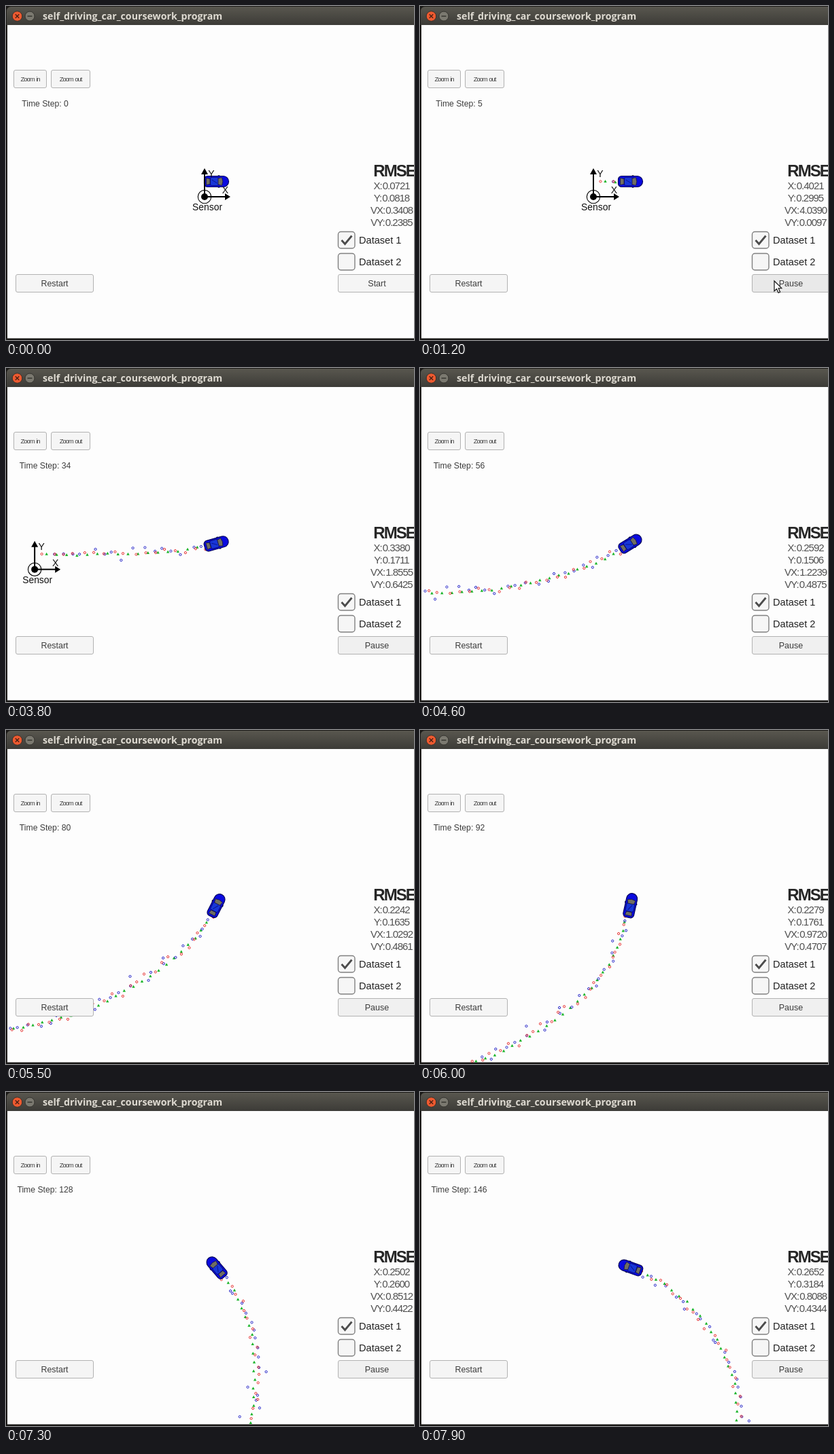
Animation of 600x492 px, one loop 8000 ms. Source, as an HTML page with a canvas:

```html
<!DOCTYPE html>
<html lang="en">
<head>
<meta charset="utf-8">
<title>Tracking simulator</title>
<style>
html, body { margin: 0; height: 100%; overflow: hidden; background: #1a1917; }
canvas { display: block; }
</style>
</head>
<body>
<canvas id="stage" width="600" height="492"></canvas>
<script>
const ctx = document.getElementById('stage').getContext('2d');
const SANS = '"Liberation Sans", Arial, sans-serif';
const LOOP = 8000, LAST_STEP = 146, CAR_X = 309.5, CAR_Y = 258.5;

// [time in ms, simulation step]: two stalls, then a steady run
const clock = [[0, 0], [900, 0], [1200, 5], [2000, 5], [2200, 7], [2700, 7], [3100, 14],
  [4600, 56], [5500, 80], [6600, 107], [7900, LAST_STEP]];

// step, world x, world y, heading in degrees, RMSE of x, y, vx, vy
const poses = [
  [0, 0, 0, 0, .0721, .0818, .3408, .2385],
  [5, 37, 0, 0, .4021, .2995, 4.0390, .0097],
  [14, 105, -1, 1, .4096, .1898, 2.4297, .7834],
  [56, 397, -73, 32, .2592, .1506, 1.2239, .4875],
  [80, 520, -191, 63, .2242, .1635, 1.0292, .4861],
  [107, 551, -361, 96, .2326, .1918, .9006, .4514],
  [LAST_STEP, 391, -566, 160, .2652, .3184, .8088, .4344]
];

const lerp = (a, b, u) => a + (b - a) * u;

// Seeded noise between -1 and 1
function noise(n) {
  const v = Math.sin(n * 12.9898) * 43758.5453;
  return 2 * (v - Math.floor(v)) - 1;
}

function segment(table, key) {
  let i = 0;
  while (i < table.length - 2 && key >= table[i + 1][0]) i++;
  const a = table[i], b = table[i + 1];
  return [a, b, (key - a[0]) / (b[0] - a[0])];
}

function stepAt(ms) {
  const [a, b, u] = segment(clock, ms);
  return Math.round(lerp(a[1], b[1], u));
}

// Cubic path through the poses, tangent to each heading
function poseAt(step) {
  const [a, b, u] = segment(poses, step);
  const speed = 1.03 * Math.hypot(b[1] - a[1], b[2] - a[2]);
  const ha = a[3] * Math.PI / 180, hb = b[3] * Math.PI / 180;
  const curve = (p, q, m, n) => (1 + 2 * u) * (1 - u) ** 2 * p + u * u * (3 - 2 * u) * q
    + speed * (u * (1 - u) ** 2 * m + u * u * (u - 1) * n);
  return {
    x: curve(a[1], b[1], Math.cos(ha), Math.cos(hb)),
    y: curve(a[2], b[2], -Math.sin(ha), -Math.sin(hb)),
    heading: lerp(ha, hb, u),
    rmse: a.slice(4).map((v, i) => lerp(v, b[i + 4], u))
  };
}

// A point beside the path: `ahead` along the heading, `left` across it
function beside(step, ahead, left) {
  const p = poseAt(step), c = Math.cos(p.heading), s = Math.sin(p.heading);
  return [p.x + ahead * c - left * s, p.y - ahead * s - left * c];
}

// Every other step leaves an estimate, a lidar and a radar reading
const markers = [];
for (let s = 0; s <= LAST_STEP; s += 2) {
  const early = Math.min(1, (s + 2) / 30);
  const drift = 6 * Math.exp(-(((s - 100) / 12) ** 2));
  const wild = noise(s + 900);
  markers.push(
    { step: s + 2, at: beside(s, 0, drift - 1 + 1.5 * noise(s + 1)), color: '#18b428', solid: true },
    { step: s + 1, at: beside(s, -5 + 3 * noise(s + 300), 6 * early * noise(s + 500)), color: '#e83030' },
    { step: s + 2, at: beside(s + 1, 5 * noise(s + 700), early * (5 * wild + 18 * wild ** 5)), color: '#2222c8' }
  );
}

function text(str, x, y, size, { align = 'center', color = '#3c3c3c', weight = '', space = 0, gap = 0, family = SANS } = {}) {
  ctx.font = `${weight} ${size}px ${family}`;
  ctx.textAlign = align;
  ctx.letterSpacing = space + 'px';
  ctx.wordSpacing = gap + 'px';
  ctx.fillStyle = color;
  ctx.fillText(str, x, y);
}

function paint(fill, stroke, width = 1) {
  if (fill) { ctx.fillStyle = fill; ctx.fill(); }
  if (stroke) { ctx.strokeStyle = stroke; ctx.lineWidth = width; ctx.stroke(); }
}

function box(x, y, w, h, r, ...style) {
  ctx.beginPath();
  ctx.roundRect(x, y, w, h, r);
  paint(...style);
}

function disc(x, y, r, ...style) {
  ctx.beginPath();
  ctx.arc(x, y, r, 0, 7);
  paint(...style);
}

function line(points, color, width) {
  ctx.beginPath();
  for (const [x, y] of points) ctx.lineTo(x, y);
  paint(null, color, width);
}

function poly(points, ...style) {
  ctx.beginPath();
  for (const [x, y] of points) ctx.lineTo(x, y);
  ctx.closePath();
  paint(...style);
}

function drawWindow() {
  ctx.fillStyle = '#1a1917';
  ctx.fillRect(0, 0, 600, 492);
  ctx.fillStyle = '#fdfdfd';
  ctx.fillRect(2, 28, 598, 461.5);
  const bar = ctx.createLinearGradient(0, 1, 0, 28);
  bar.addColorStop(0, '#59574f');
  bar.addColorStop(1, '#3c3b37');
  box(1, 1, 610, 27, [6, 0, 0, 0], bar);
  disc(16.5, 15, 7.3, '#ee5a30', '#37302a');
  line([[13.8, 12.3], [19.2, 17.7]], '#4a2015', 1.4);
  line([[19.2, 12.3], [13.8, 17.7]], '#4a2015', 1.4);
  disc(35, 15, 7, '#7b7970', '#35342f');
  line([[31.5, 15], [38.5, 15]], '#35342f', 1.5);
  text('self_driving_car_coursework_program', 54, 20, 14.2,
    { align: 'left', color: '#dfdbd2', weight: 'bold', family: '"Open Sans", "Noto Sans", sans-serif' });
}

function drawMarker({ at: [wx, wy], color, solid }, car) {
  const x = CAR_X + wx - car.x, y = CAR_Y + wy - car.y;
  if (x < 3 || y > 488) return;
  if (solid) poly([[x - 2.2, y + 1.8], [x, y - 2.2], [x + 2.2, y + 1.8]], color);
  else disc(x, y, 1.6, null, color, 1);
}

function drawCar(heading) {
  ctx.save();
  ctx.translate(CAR_X, CAR_Y);
  ctx.rotate(-heading);
  box(2, -9.3, 3, 18.6, 1, '#08084a');
  box(-18, -8, 36, 16, [5, 8, 8, 5], '#0a0ae0', '#05055c', 1.2);
  box(-9, -6, 12, 12, 2, '#1836d8', '#06066a', .8);
  poly([[-15, -5], [-9.5, -4], [-9.5, 4], [-15, 5]], '#706e62', '#15154a', .8);
  poly([[2.5, -4.5], [8, -6], [9.3, 0], [8, 6], [2.5, 4.5]], '#706e62', '#15154a', .8);
  line([[-7, -2.5], [1, 2.5]], '#0a1690', 1);
  ctx.restore();
}

function drawSensor(x, y) {
  disc(x, y, 9.7, null, '#000', 1.1);
  disc(x, y, 5, '#000');
  line([[x, y], [x, y - 34]], '#000', 2);
  line([[x, y], [x + 31, y]], '#000', 2);
  poly([[x - 5, y - 33], [x, y - 42], [x + 5, y - 33]], '#000');
  poly([[x + 30, y - 5], [x + 38, y], [x + 30, y + 5]], '#000');
  text('Y', x + 10, y - 29, 14, { color: '#111' });
  text('X', x + 30.5, y - 5, 14, { color: '#111' });
  text('Sensor', x + 4, y + 20, 13.9, { color: '#111' });
}

function button(x, y, w, label, size, style, fill = '#f5f5f5') {
  box(x + .5, y + .5, w - 1, 26, 2.5, fill, '#b2b2b2');
  text(label, x + w / 2, y + 13.5 + size * .36, size, style);
}

function drawPanel(step, rmse, ms) {
  const running = ms >= 1000, hover = ms >= 800 && ms < 2100;
  const tight = { space: -1.05, gap: 1 };
  button(11, 94, 49, 'Zoom in', 9.5, tight);
  button(66, 94, 58, 'Zoom out', 9.5, tight);
  button(14, 395, 115, 'Restart', 12.4);
  button(488, 395, 115, running ? 'Pause' : 'Start', 12.5, {}, hover ? '#e9e9e9' : running ? '#f0f0f0' : '#f5f5f5');
  text('Time Step: ' + step, 57.5, 148, 12.2);
  text('RMSE', 571, 251, 24, { weight: 'bold', space: -2, color: '#262626' });
  ['X', 'Y', 'VX', 'VY'].forEach((name, i) =>
    text(`${name}: ${rmse[i].toFixed(4)}`, 567, 269.5 + 18.3 * i, 15, { space: -1, gap: -2, color: '#505050' }));
  for (const i of [0, 1]) {
    const y = 332 + 32 * i;
    box(488.5, y + .5, 24.5, 24.5, 4, '#f6f6f6', '#808080', 1.4);
    text('Dataset ' + (i + 1), 519, y + 17.5, 14.6, { align: 'left', color: '#222' });
  }
  line([[493.5, 345], [498.5, 350.5], [508.5, 338.5]], '#4c4c4c', 2.8);
}

function drawCursor(ms) {
  if (ms < 600 || ms >= 2100) return;
  const u = Math.min(1, (ms - 600) / 300);
  ctx.save();
  ctx.translate(lerp(590, 521, u), lerp(466, 405, u));
  poly([[0, 0], [0, 15], [3.5, 11.8], [6, 17.5], [8.6, 16.4], [6.2, 10.8], [10.8, 10.6]], '#fff', '#111', 1.2);
  ctx.restore();
}

function draw(now) {
  const ms = Math.floor(now % LOOP / 100) * 100;
  const step = stepAt(ms), car = poseAt(step);
  drawWindow();
  for (const m of markers) if (m.step <= step) drawMarker(m, car);
  drawCar(car.heading);
  ctx.save();
  ctx.beginPath();
  ctx.rect(2, 28, 598, 461);
  ctx.clip();
  drawSensor(292 - car.x, 281 - car.y);
  ctx.restore();
  drawPanel(step, car.rmse, ms);
  drawCursor(ms);
}

let start;
function tick(now) {
  start ??= now;
  draw(Math.max(0, now - start));
  requestAnimationFrame(tick);
}
requestAnimationFrame(tick);
</script>
</body>
</html>
```
